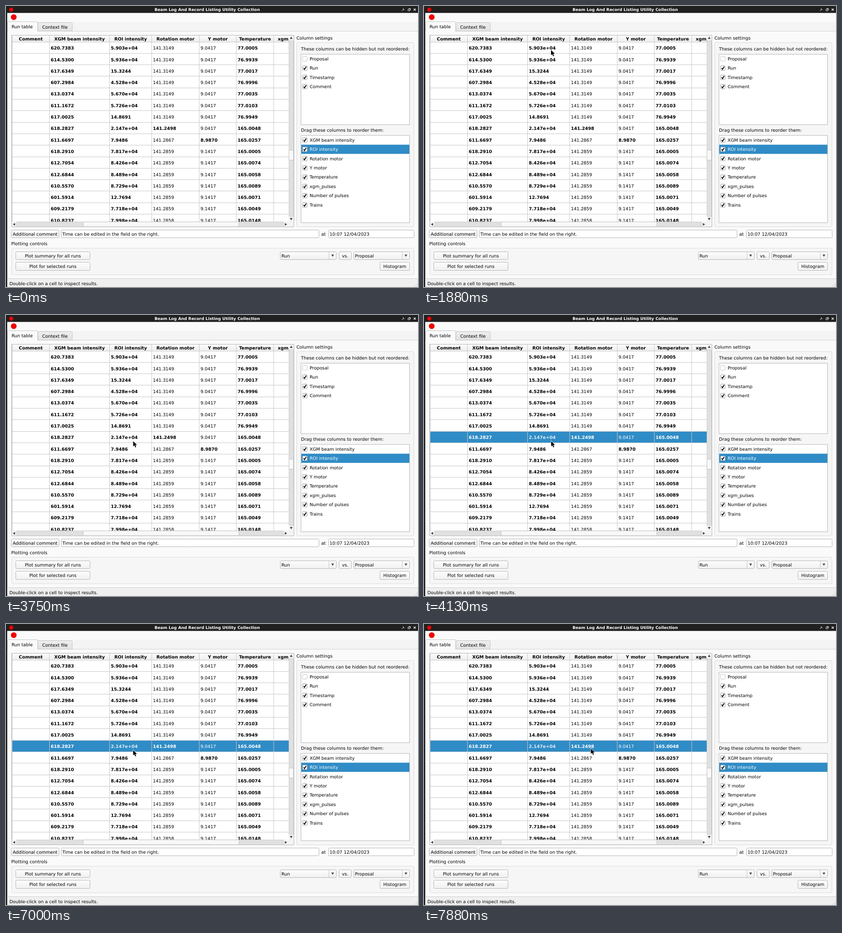
An HTML page with a canvas for the animation above (8000 ms loop, 905 by 619 pixels).

```html
<!DOCTYPE html>
<html lang="en">
<head>
<meta charset="utf-8">
<title>Run table</title>
<style>
  html, body { margin: 0; width: 100%; height: 100%; overflow: hidden; background: #000; }
  canvas { display: block; }
</style>
</head>
<body>
<canvas id="stage" width="905" height="619"></canvas>
<script>
const ctx = document.getElementById('stage').getContext('2d');
ctx.textRendering = 'geometricPrecision';
const LOOP = 8000, TICK = 125;
const BLUE = '#308cc6', RED = '#f00000', BORDER = '#b4b4b4';

// Drawing helpers; text is placed by the middle of its capitals.
function text(str, x, y, { align = 'left', size = 9.75, weight = '', color = '#000' } = {}) {
  ctx.font = `${weight} ${size}px "DejaVu Sans", sans-serif`;
  ctx.textAlign = align;
  ctx.fillStyle = color;
  ctx.fillText(str, x, y + size * 0.364);
}
function box(x0, y0, x1, y1, fill, stroke, radius = 0) {
  ctx.beginPath();
  ctx.roundRect(x0, y0, x1 - x0, y1 - y0, radius);
  if (fill) { ctx.fillStyle = fill; ctx.fill(); }
  if (stroke) { ctx.strokeStyle = stroke; ctx.lineWidth = 1; ctx.stroke(); }
}
function line(points, color, width = 1) {
  ctx.beginPath();
  points.forEach(([x, y]) => ctx.lineTo(x, y));
  ctx.strokeStyle = color;
  ctx.lineWidth = width;
  ctx.stroke();
}
function poly(points, color) {
  ctx.beginPath();
  points.forEach(([x, y]) => ctx.lineTo(x, y));
  ctx.closePath();
  ctx.fillStyle = color;
  ctx.fill();
}
function dot(x, y, r, color) {
  ctx.beginPath();
  ctx.arc(x, y, r, 0, 7);
  ctx.fillStyle = color;
  ctx.fill();
}
function shade(y0, y1, from, to) {
  const g = ctx.createLinearGradient(0, y0, 0, y1);
  g.addColorStop(0, from);
  g.addColorStop(1, to);
  return g;
}
function arrow(x, y, dx, dy, r = 2.5) {
  poly([[x + dx * r, y + dy * r], [x - dx * r + dy * r * 1.2, y - dy * r + dx * r * 1.2],
        [x - dx * r - dy * r * 1.2, y - dy * r - dx * r * 1.2]], '#444');
}
function button(label, x0, y0, x1, y1) {
  box(x0 + .5, y0 + .5, x1 - .5, y1 - .5, shade(y0, y1, '#fdfdfd', '#f0f0f0'), BORDER, 2);
  text(label, (x0 + x1) / 2, (y0 + y1) / 2, { align: 'center' });
}
function field(label, x0, x1) {
  box(x0 + .5, 493.5, x1 - .5, 510.5, '#fff', BORDER, 2);
  text(label, x0 + 2.7, 502);
}
function combo(label, x0, x1) {
  button('', x0, 541, x1, 559);
  line([[x1 - 16.5, 542], [x1 - 16.5, 558]], '#c4c4c4');
  arrow(x1 - 8.5, 550, 0, 1);
  text(label, x0 + 3, 550);
}
function checkbox(x, y, checked) {
  box(x - 5, y - 5, x + 5, y + 5, '#fff', checked ? '#999' : '#c4c4c4', 1);
  if (checked) line([[x - 2.8, y], [x - .8, y + 2.8], [x + 3, y - 3.2]], '#000', 1.9);
}
function windowButtons(x, y, color) {
  line([[x - 3, y + 3], [x, y], [x, y - 3]], color);
  line([[x, y], [x + 3, y]], color);
  box(x + 10.5, y - 1, x + 14.5, y + 2.5, null, color);
  line([[x + 12, y - 2.5], [x + 16, y - 2.5], [x + 16, y + 1]], color);
  line([[x + 23, y - 2.3], [x + 27.6, y + 2.3]], color, 1.4);
  line([[x + 27.6, y - 2.3], [x + 23, y + 2.3]], color, 1.4);
}

// Table contents
const HEADERS = ['Comment', 'XGM beam intensity', 'ROI intensity', 'Rotation motor', 'Y motor', 'Temperature'];
const EDGES = [13.5, 95.5, 227.5, 320, 424.5, 506, 588];
const words = s => s.split(' ');
const XGM = words('620.7383 614.5300 617.6349 607.2984 613.0374 611.1672 617.0025 618.2827 611.6697 618.2910 612.7054 612.6844 610.5570 601.5914 609.2179 610.8237');
const ROI = words('5.903e+04 5.936e+04 15.3244 4.528e+04 5.670e+04 5.726e+04 14.8691 2.147e+04 7.9486 7.817e+04 8.426e+04 8.489e+04 8.729e+04 12.7694 7.718e+04 7.998e+04');
const TEMP = words('77.0005 76.9939 77.0017 76.9996 77.0035 77.0103 76.9949 165.0048 165.0257 165.0005 165.0074 165.0058 165.0089 165.0071 165.0049 165.0148');
const rotation = i => i < 7 ? '141.3149' : i === 7 ? '141.2498' : i === 8 ? '141.2867' : i < 15 ? '141.2859' : '141.2858';
const yMotor = i => i < 8 ? '9.0417' : i === 8 ? '8.9870' : '9.1417';
const ROW = 25.3, TOP = 79.5, PICKED = 7;

function drawTable(selected) {
  box(12.5, 64.5, 632.5, 486.5, '#fff', BORDER);
  ctx.save();
  ctx.beginPath();
  ctx.rect(13, 65, 608, 410);
  ctx.clip();
  box(13, 65, 621, 79, shade(65, 79, '#fcfcfc', '#eeeeee'));
  HEADERS.forEach((h, i) =>
    text(h, (EDGES[i] + EDGES[i + 1]) / 2, 72, { align: 'center', weight: 'bold' }));
  text('xgm_pulses', 597, 72, { weight: 'bold' });
  if (selected) box(13, TOP + PICKED * ROW - .5, 621, TOP + (PICKED + 1) * ROW, BLUE);
  EDGES.forEach(x => line([[x, 65], [x, 475]], '#c6c6c6'));
  for (let i = 0; i < 16; i++) {
    const y = TOP + i * ROW, lit = selected && i === PICKED;
    line([[13, Math.round(y) - .5], [621, Math.round(y) - .5]], '#c6c6c6');
    [XGM[i], ROI[i], rotation(i), yMotor(i), TEMP[i]].forEach((value, c) => {
      const plain = c === 2 && i !== 7 || c === 3 && i !== 8;
      text(value, EDGES[c + 1] + 2.7, y + 13.2,
        { weight: plain ? '' : 'bold', color: !lit ? '#000' : c === 1 ? '#dcebf5' : '#fff' });
    });
  }
  ctx.restore();

  box(621, 65, 632, 486, '#f4f4f4');
  box(621.5, 76.5, 631.5, 463.5, '#e0e0e0', '#cfcfcf');
  box(621.5, 317.5, 631.5, 339.5, '#f8f8f8', '#c0c0c0');
  arrow(626.5, 70, 0, -1);
  arrow(626.5, 469.5, 0, 1);
  box(13, 475, 621, 486, '#f4f4f4');
  box(23.5, 475.5, 609.5, 486, '#e0e0e0', '#cfcfcf');
  box(169.5, 475.5, 511.5, 486, '#f8f8f8', '#c0c0c0');
  arrow(17.5, 481, -1, 0);
  arrow(615, 481, 1, 0);
}

function drawList(items, y0, y1, unchecked, picked) {
  box(648, y0 + .5, 886.5, y1 - .5, '#fff', BORDER);
  items.forEach((item, i) => {
    const y = y0 + 10.5 + i * 20.43;
    if (i === picked) box(648.5, y - 10.2, 886, y + 10.2, BLUE);
    checkbox(656.5, y, i !== unchecked);
    text(item, 667, y, { color: i === picked ? '#fff' : '#000' });
  });
}

function drawMain(selected, active) {
  box(0, 0, 905, 619, '#efefef');
  box(0, 0, 905, 15.5, '#202020');
  dot(11.5, 8, 4.5, RED);
  text('Beam Log And Record Listing Utility Collection', 442, 7.5,
    { align: 'center', size: 8.8, weight: 'bold', color: active ? '#fff' : '#9a9a9a' });
  windowButtons(872.5, 8, active ? '#e8e8e8' : '#8a8a8a');
  box(3, 15.5, 905, 35, '#fafafa');
  dot(17, 24.5, 6.3, RED);

  box(3, 35, 905, 55, '#f4f4f4');
  box(3, 55.5, 906, 600.5, '#fafafa', '#d0d0d0');
  box(70, 36.5, 145.5, 55.5, shade(36, 56, '#eeeeee', '#e2e2e2'), '#c4c4c4', [2, 2, 0, 0]);
  box(3.5, 34.5, 69.5, 56, '#fafafa', '#c4c4c4', [2, 2, 0, 0]);
  box(4, 55, 69, 57, '#fafafa');
  text('Run table', 35.5, 45.2, { align: 'center' });
  text('Context file', 107.5, 46, { align: 'center' });
  drawTable(selected);

  text('Column settings', 638, 70.8);
  box(638.5, 80.5, 896, 486.5, '#f6f6f6', '#dadada', 2);
  text('These columns can be hidden but not reordered:', 648, 94.5);
  drawList(['Proposal', 'Run', 'Timestamp', 'Comment'], 105.8, 262, 0);
  text('Drag these columns to reorder them:', 648, 273.3);
  drawList(['XGM beam intensity', 'ROI intensity', 'Rotation motor', 'Y motor', 'Temperature',
    'xgm_pulses', 'Number of pulses', 'Trains'], 284.7, 478, -1, 1);

  button('Additional comment', 11, 493, 117, 511);
  field('Time can be edited in the field on the right.', 121, 688);
  text('at', 692.5, 502);
  field('10:07 12/04/2023', 708, 897);

  text('Plotting controls', 11.5, 523);
  box(12.5, 533.5, 896, 592, '#f6f6f6', '#dadada', 2);
  button('Plot summary for all runs', 21, 541, 185, 559);
  button('Plot for selected runs', 21, 564, 185, 583);
  combo('Run', 602, 726);
  button('vs.', 731, 541, 759, 559);
  combo('Proposal', 763.5, 887);
  button('Histogram', 821, 564, 887, 583);
  text('Double-click on a cell to inspect results.', 7.5, 611);
  for (let i = 0; i < 6; i++) for (let j = 5 - i; j < 6; j += 2)
    box(897 + i * 1.4, 610 + j * 1.4, 898 + i * 1.4, 611 + j * 1.4, '#c8c8c8');
  box(0, 15, 2.5, 619, '#101010');
}

// Scatter plot
const px = v => 263 + v * 0.15317;
const py = v => 401.5 - v * 0.002232;

function drawPoints() {
  let seed = 687;
  const rnd = () => (seed = (seed * 16807) % 2147483647) / 2147483647;
  const gauss = () => rnd() + rnd() + rnd() + rnd() - 2;
  const point = (x, y) => {
    ctx.beginPath();
    ctx.arc(px(x), py(y), 3.7, 0, 7);
    ctx.fill();
  };
  ctx.fillStyle = 'rgba(31,119,180,0.5)';
  for (let x = -125; x < -18; x += .85) point(x, 112000 - Math.max(0, x + 65) * 220 + gauss() * 20000);
  for (let x = -22; x < 0; x += 1.3) point(x, 78000 * Math.exp(-(x + 22) / 13) * (.8 + rnd() * .4));
  for (let x = -10; x < 3215; x += 1.2) {
    const d = (x - 1690) / (x < 1690 ? 165 : 190), peak = 1 / (1 + d * d);
    let y = 1000 + 107000 * peak + 16000 * Math.exp(-Math.max(x, 0) / 48);
    y *= 1 + gauss() * (.34 - .18 * peak);
    if (x > 1250 && x < 2100 && rnd() < .09) y *= .3 + rnd() * .6;
    if (x > 1850 && x < 2750 && rnd() < .1) y *= 1.15 + rnd() * .5;
    if (x < 40) y *= .75 + rnd() * .45;
    point(x, Math.max(y, 1500) + gauss() * 500);
  }
  [[-110, 69000], [-100, 135500], [2000, 95000], [2078, 66000], [2243, 51500], [1935, 86500], [1855, 104000],
   [1790, 122500], [1680, 128000], [1760, 126500], [2265, 26000], [1938, 4000], [1725, 26000]].forEach(p => point(...p));
}

function drawPlot() {
  drawPoints();
  const label = { size: 11.25, align: 'center' };
  for (let v = 0; v <= 3000; v += 500) {
    line([[px(v), 82.5], [px(v), 413.5]], '#b0b0b0', .9);
    line([[px(v), 413.5], [px(v), 417.5]], '#000', .9);
    text(v, px(v), 425.5, label);
  }
  for (let v = 0; v <= 140000; v += 20000) {
    line([[218.5, py(v)], [780.5, py(v)]], '#b0b0b0', .9);
    line([[214.5, py(v)], [218.5, py(v)]], '#000', .9);
    text(v, 210.5, py(v), { size: 11.25, align: 'right' });
  }
  box(218.5, 82.5, 780.5, 413.5, null, '#000');
  text('ROI intensity vs. Event (run 687)', 498.5, 71, { size: 13.5, align: 'center' });
  text('Event (run 687)', 498.5, 442.3, label);
  text('+1.33381e9', 779.5, 441, { size: 11.25, align: 'right' });
  ctx.save();
  ctx.translate(155.5, 248);
  ctx.rotate(-Math.PI / 2);
  text('ROI intensity', 0, 0, label);
  ctx.restore();
}

function drawToolbar() {
  const y = 524, ink = '#111', grey = '#666';
  poly([[146, y], [153.5, y - 6.5], [161, y], [159.5, y + 1], [153.5, y - 4], [147.5, y + 1]], ink);
  poly([[148.5, y + 1], [153.5, y - 3], [158.5, y + 1], [158.5, y + 5.5], [155, y + 5.5],
        [155, y + 2], [152, y + 2], [152, y + 5.5], [148.5, y + 5.5]], ink);
  [[177.5, -1], [201, 1]].forEach(([x, d]) => {
    line([[x - d * 6, y], [x + d * 5, y]], grey, 2.2);
    line([[x, y - 5.5], [x + d * 5.5, y], [x, y + 5.5]], grey, 2.2);
  });
  line([[224, y], [236, y]], ink, 1.8);
  line([[230, y - 6], [230, y + 6]], ink, 1.8);
  [[0, 1], [0, -1], [1, 0], [-1, 0]].forEach(([dx, dy]) =>
    poly([[230 + dx * 7.5, y + dy * 7.5], [230 + dx * 4 + dy * 3, y + dy * 4 + dx * 3],
          [230 + dx * 4 - dy * 3, y + dy * 4 - dx * 3]], ink));
  ctx.beginPath();
  ctx.arc(252.8, y - 1.2, 4.4, 0, 7);
  ctx.lineWidth = 2.1;
  ctx.stroke();
  line([[256, y + 2], [260.5, y + 6.5]], ink, 2.6);
  [[-4.5, 2], [0, 8], [4.5, 4]].forEach(([dy, knob]) => {
    line([[271, y + dy], [284.5, y + dy]], ink, 1.6);
    box(270.5 + knob, y + dy - 1.9, 273.5 + knob, y + dy + 1.9, ink);
  });
  line([[295.5, y - 6], [295.5, y + 5.5], [309.5, y + 5.5]], ink, 1.7);
  line([[297.5, y + 2.5], [300.5, y - 1.5], [303.5, y + 1], [308, y - 4]], ink, 1.9);
  poly([[309.5, y - 6], [309.5, y - 1], [304.5, y - 6]], ink);
  box(324.5, y - 6, 336.5, y + 6, ink, null, [1, 4, 1, 1]);
  box(326.5, y - 4.5, 332.5, y - 1.5, '#fff');
  box(326.5, y + 1, 334.5, y + 4.6, '#fff');
}

function drawDialog() {
  box(127.5, 25.5, 803.5, 549.5, '#000', null, 2);
  box(129.5, 27, 802, 42.5, '#202020');
  box(130, 42.5, 801.5, 547, '#fff');
  box(135, 30.5, 143.5, 38, '#e6e9ee');
  box(135, 30.5, 143.5, 33, '#5a8dbb');
  text('sample-plot', 453.5, 34, { align: 'center', size: 8.8, weight: 'bold', color: '#fff' });
  windowButtons(768, 34, '#e8e8e8');
  drawPlot();
  text('Autoscale', 776.5, 474, { align: 'right' });
  checkbox(786.5, 474, true);
  text('Display hover annotations', 776.5, 496, { align: 'right' });
  checkbox(786.5, 496, false);
  drawToolbar();
}

// Pointer path: time, x, y
const PATH = [[875, 278, -4], [1125, 275, 44], [1375, 276, 75], [1625, 277, 85], [1875, 279, 96.5],
  [2125, 281, 143], [2375, 280, 217], [2500, 278, 243], [2750, 278, 275], [3000, 278.5, 282],
  [3250, 278.5, 282], [3500, 279.3, 278.5], [3625, 279.3, 278.5], [3750, 279.3, 277.5],
  [7375, 279.3, 277.5], [7500, 284, 277], [7625, 302, 275.5], [7750, 333, 274], [7875, 366.5, 274]];

function drawPointer(t) {
  if (t < PATH[0][0]) return;
  const i = Math.max(1, PATH.findIndex(p => p[0] >= t));
  const [t0, x0, y0] = PATH[i - 1], [t1, x1, y1] = PATH[i];
  const k = (t - t0) / (t1 - t0);
  ctx.save();
  ctx.translate(x0 + (x1 - x0) * k, y0 + (y1 - y0) * k);
  ctx.scale(.93, .93);
  const shape = [[0, .5], [0, 13], [2.9, 10.3], [5, 15.2], [7.1, 14.3], [5.1, 9.6], [9, 9.4]];
  line([...shape, shape[0], shape[1]], '#fff', 1.6);
  poly(shape, '#000');
  ctx.restore();
}

let shown = -1;
function frame(now) {
  const tick = Math.floor((now % LOOP) / TICK);
  if (tick !== shown) {
    shown = tick;
    const t = tick * TICK, dialog = t >= 4375 && t < 7000;
    drawMain(t >= 4125, !dialog);
    if (dialog) drawDialog();
    drawPointer(t);
  }
  requestAnimationFrame(frame);
}
frame(0);
</script>
</body>
</html>
```
